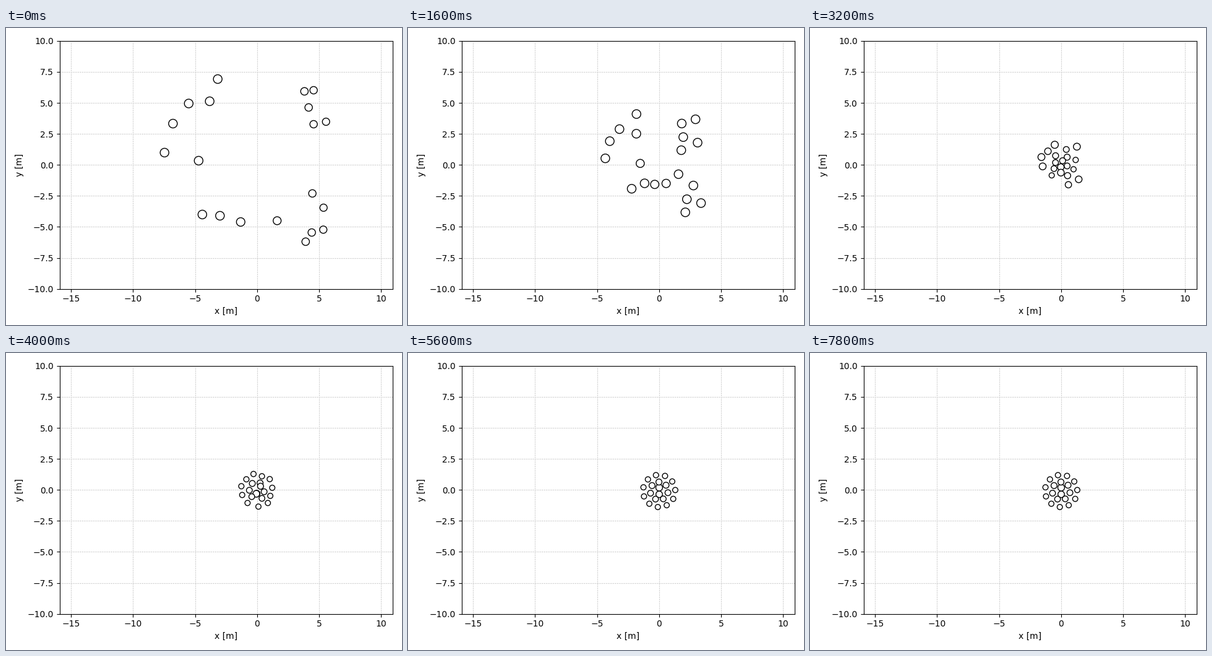
Animation of 640x480 px, one loop 8000 ms. Source, as a matplotlib script:

```python
import numpy as np
import matplotlib.pyplot as plt
from matplotlib.animation import FuncAnimation

STEP = 200        # ms per frame
FRAMES = 40
SUBSTEPS = 10     # simulation steps per frame
DPI = 100
SPEED = 0.4       # metres per frame
PUSH = 0.04       # repulsion at one metre, metres per frame
CRUISE_R = 7.0    # pixels

# Starting points in metres: outer ring clockwise, then core, then inner ring
START = np.array([
    (-3.18, 6.92), (3.81, 5.93), (4.55, 6.02), (5.55, 3.48), (5.35, -3.45),
    (5.33, -5.22), (3.91, -6.19), (-4.42, -4.00), (-7.47, 0.99),
    (-6.79, 3.33), (-5.52, 4.95),
    (-1.33, -4.60), (1.61, -4.50),
    (-3.83, 5.13), (4.15, 4.63), (4.55, 3.28), (4.45, -2.30),
    (4.40, -5.45), (-3.00, -4.10), (-4.72, 0.34)])


def ring(count, radius, first):
    """Evenly spaced places, clockwise from the angle `first` in degrees."""
    a = np.radians(first - 360 / count * np.arange(count))
    return np.column_stack([radius * np.cos(a), radius * np.sin(a) - 0.085])


def length(v):
    return np.linalg.norm(v, axis=-1, keepdims=True)


def smooth(u):
    u = np.clip(u, 0, 1)
    return u * u * (3 - 2 * u)


def velocity(pos):
    """Constant pull to the origin plus mutual repulsion, per frame."""
    pull = -SPEED * pos / np.maximum(length(pos), 0.3)
    gap = pos[:, None] - pos[None]
    push = PUSH * gap / np.maximum(length(gap), 0.35) ** 4
    return pull + push.sum(axis=1)


def simulate():
    path, pos = [START], START
    for _ in range(FRAMES - 1):
        for _ in range(SUBSTEPS):
            pos = pos + velocity(pos) / SUBSTEPS
        path.append(pos)
    return path


PATH = simulate()
SLOTS = np.vstack([ring(11, 1.30, 101.5), ring(2, 0.27, -90),
                   ring(7, 0.72, 143)])
START_R = CRUISE_R - 1.1 * np.clip((START[:, 0] + 2.3) / 7.5, 0, 1)
REST_R = 4.2 + 1.3 * np.exp(-(length(SLOTS)[:, 0] / 0.8) ** 2)
ARRIVAL = (length(START)[:, 0] - 2) / SPEED   # in frames


def places(i):
    """The flock relaxes from its free path into the rings."""
    return PATH[i] + (SLOTS - PATH[i]) * smooth((i - 14) / 12)


def radii(i):
    """Grow to the cruising size, then shrink on arrival."""
    if i < 4:
        return START_R + (CRUISE_R - START_R) * i / 4
    late = np.maximum(i - ARRIVAL, 0)
    return REST_R + (CRUISE_R - REST_R) * np.exp(-(late / 2.5) ** 2)


fig, ax = plt.subplots(figsize=(6.4, 4.8), dpi=DPI)
ax.set(xlabel="x [m]", ylabel="y [m]", xlim=(-15.9, 10.9), ylim=(-10, 10))
ax.grid(linestyle=":")
fig.tight_layout()
fig.subplots_adjust(top=fig.subplotpars.top - 0.0006)

# equal scale on both axes
box = ax.get_window_extent()
half = 10 * box.width / box.height
ax.set_xlim(-2.5 - half, -2.5 + half)

dots = ax.scatter(*START.T, facecolors="white", edgecolors="black",
                  linewidths=1.0, zorder=3)


def draw(i):
    dots.set_offsets(places(i))
    dots.set_sizes((2 * radii(i) * 72 / DPI) ** 2)
    return dots,


anim = FuncAnimation(fig, draw, frames=FRAMES, interval=STEP,
                     repeat=True, repeat_delay=0)
plt.show()
```
